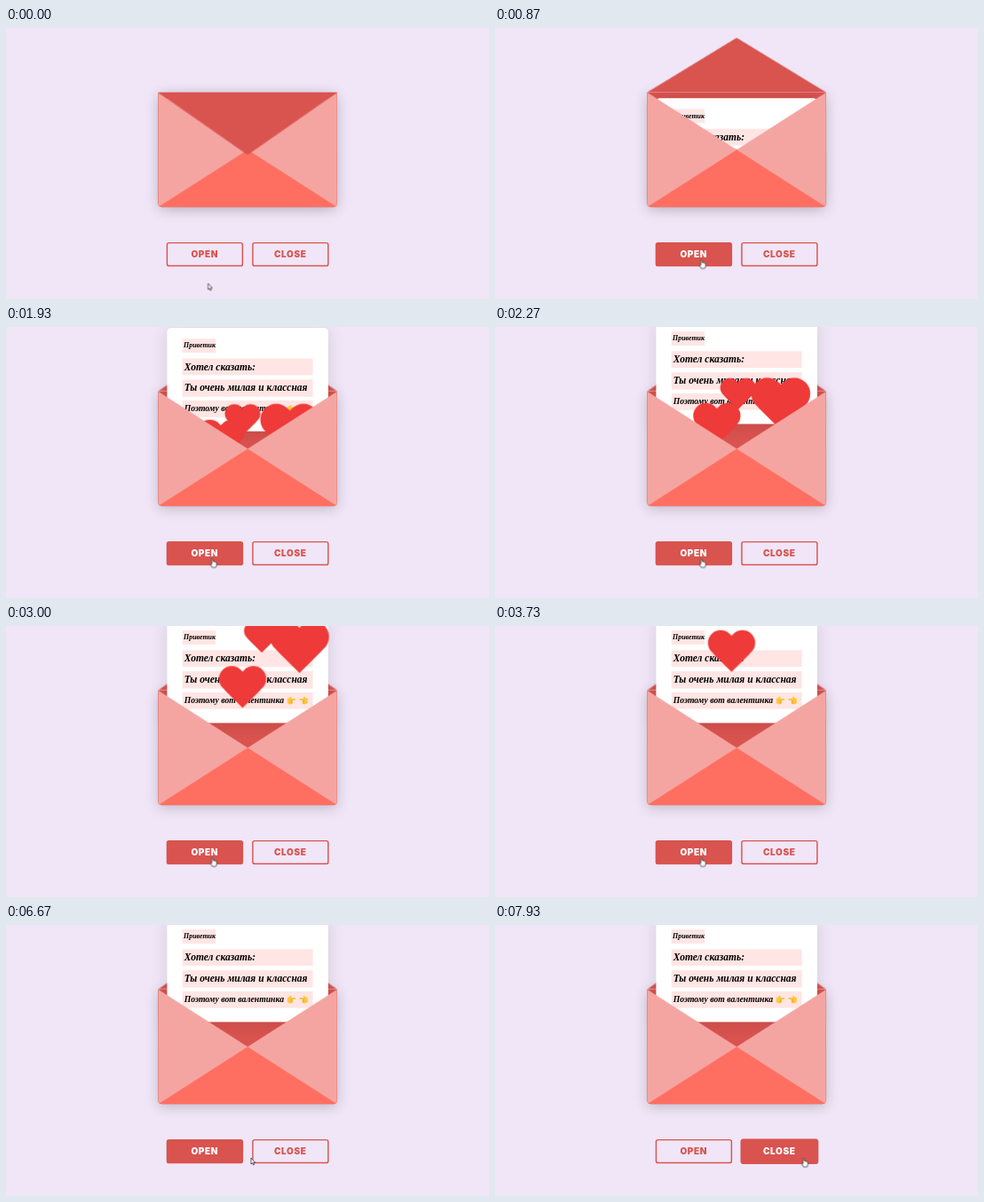
These frames come from a looping animation (544x306 px, 8 s). An HTML page:

```html
<!DOCTYPE html>
<html lang="ru">
<head>
<meta charset="utf-8">
<title>Valentine envelope</title>
<style>
  :root { --red: #d9534f; --coral: #ff6f61; --pink: #f5a5a1; --heart: #ee3a38; --paper: #f0e6f7; }
  html, body { margin: 0; width: 100%; height: 100%; overflow: hidden; background: var(--paper); }
  #stage { position: relative; width: 544px; height: 306px; overflow: hidden; background: var(--paper); }
  #scene { position: absolute; left: 0; top: 0; width: 755.6px; height: 425px; transform: scale(.72); transform-origin: 0 0; }
  #scene * { box-sizing: border-box; }

  .envelope {
    position: absolute; left: 237.8px; top: 100.8px; width: 280px; height: 180px;
    background: var(--red); border-radius: 0 0 6px 6px; box-shadow: 0 4px 20px rgba(0, 0, 0, .2);
  }
  .flap {
    position: absolute; z-index: 5; width: 280px; height: 98px; background: var(--red);
    clip-path: polygon(0 0, 100% 0, 50% 100%); transform-origin: top;
    animation: flap 8s infinite, sink 8s step-end infinite;
  }
  .pocket {
    position: absolute; z-index: 3; width: 0; height: 0; border: solid var(--pink); border-width: 90px 140px;
    border-top-color: transparent; border-bottom-color: var(--coral); border-radius: 0 0 6px 6px;
  }
  #scene .pocket { box-sizing: content-box; }

  .letter {
    position: absolute; z-index: 1; left: 14px; top: 9px; width: 252px; height: 162px;
    background: #fff; border-radius: 6px; box-shadow: 0 2px 26px rgba(0, 0, 0, .12);
    animation: letter 8s infinite;
  }
  .line {
    position: absolute; left: 24.5px; width: 204px; height: 26.5px; padding-left: 2.5px;
    background: #ffe5e3; color: #000; white-space: nowrap;
    font: italic bold 16px/26px "Liberation Serif", serif;
  }
  .hello { top: 17px; width: 52px; height: 22px; padding-left: 1.5px; font-size: 11px; line-height: 21px; }
  .last { font-size: 13.5px; line-height: 25px; }
  .line svg { position: absolute; top: 6px; width: 15px; height: 14px; }

  /* Zero-sized anchors: each heart grows from its top centre */
  .heart {
    position: absolute; z-index: 2; top: 90px; width: 0; height: 0;
    animation: rise 8s linear infinite, sway 8s ease-in-out infinite;
  }
  .heart::before, .heart::after {
    content: ""; position: absolute; left: 0; top: 0; width: 50px; height: 80px;
    background: var(--heart); border-radius: 25px 25px 0 0;
    transform: rotate(-45deg); transform-origin: 0 100%;
  }
  .heart::after { left: -50px; transform: rotate(45deg); transform-origin: 100% 100%; }
  .small  { left: 125.2px; scale: .6; --speed: 120px; --sway: 40px; }
  .large  { left: 204px; --speed: 120px; --sway: 50px; animation-name: rise, slow-sway; }
  .medium { left: 90.4px; scale: .8; --speed: 77.14px; --sway: 45px; }

  .button {
    position: absolute; top: 336px; width: 120px; height: 37.6px; padding: 0;
    border: 2px solid var(--red); border-radius: 4px; background: transparent; color: var(--red);
    font: 900 14px/33.6px Inter, "Open Sans", sans-serif; letter-spacing: .8px; text-align: center;
  }
  .open { left: 250.8px; animation: open-fill 8s linear infinite, open-press 8s step-end infinite; }
  .close { left: 384.8px; animation: close-fill 8s linear infinite, close-press 8s step-end infinite; }

  #cursor { position: absolute; left: 0; top: 0; animation: cursor 8s infinite; }
  #cursor svg { position: absolute; left: 0; top: 0; overflow: visible; }
  .arrow { animation: arrow 8s step-end infinite; }
  .hand { animation: hand 8s step-end infinite; }

  @keyframes flap {
    0%, 8.19% { transform: rotateX(0deg); animation-timing-function: ease; }
    13.19%, 100% { transform: rotateX(180deg); }
  }
  @keyframes sink { 0% { z-index: 5; } 13.19%, 100% { z-index: 0; } }
  @keyframes letter {
    0%, 16.25% { transform: translateY(0); animation-timing-function: ease; }
    28.75%, 100% { transform: translateY(-120px); }
  }
  @keyframes rise {
    0%, 16.94% { translate: 0 0; }
    100% { translate: 0 calc(var(--speed) * -6.645); }
  }
  @keyframes sway {
    0%, 16.94%, 66.94%, 100% { margin-left: 0; }
    41.94% { margin-left: var(--sway); }
  }
  @keyframes slow-sway {
    0%, 16.94% { margin-left: 0; }
    66.94%, 100% { margin-left: var(--sway); }
  }
  @keyframes open-fill {
    0%, 3.25%, 84.75%, 100% { background-color: transparent; color: var(--red); }
    4.5%, 83.5% { background-color: var(--red); color: #fff; }
  }
  @keyframes close-fill {
    0%, 84.25% { background-color: transparent; color: var(--red); }
    85.5%, 100% { background-color: var(--red); color: #fff; }
  }
  @keyframes open-press {
    0%, 8.19%, 100% { box-shadow: none; }
    7.5% { box-shadow: 0 0 0 1px var(--red); }
  }
  @keyframes close-press {
    0% { box-shadow: none; }
    96.6%, 100% { box-shadow: 0 0 0 1px var(--red); }
  }
  @keyframes cursor {
    0%, .87% { transform: translate(227.6px, 288.4px); animation-timing-function: ease-in-out; }
    5%, 79.1% { transform: translate(232.5px, 261.5px); animation-timing-function: ease-in; }
    83.37% { transform: translate(275.7px, 263px); animation-timing-function: ease-out; }
    90.8%, 100% { transform: translate(347.6px, 263.2px); }
  }
  @keyframes arrow {
    0%, 82.7% { visibility: visible; }
    3.2%, 83.6%, 100% { visibility: hidden; }
  }
  @keyframes hand {
    0%, 82.7% { visibility: hidden; }
    3.2%, 83.6%, 100% { visibility: visible; }
  }
</style>
</head>
<body>
<div id="stage">
  <div id="scene">
    <div class="envelope">
      <div class="flap"></div>
      <div class="letter">
        <div class="line hello">Приветик</div>
        <div class="line" style="top:48px">Хотел сказать:</div>
        <div class="line" style="top:81.5px">Ты очень милая и классная</div>
        <div class="line last" style="top:114px">Поэтому вот валентинка
          <svg viewBox="0 0 15 14" style="left:162.5px">
            <g id="point">
              <path d="M1 4Q4 3 6 1Q8 0 8 2L7 4H13.5Q15 5.2 13.5 6.5H9.5V11Q9 13 6 13Q2 13 1 11Z" fill="#ffc83d"/>
              <path d="M6 6.5H9.5M6 9H9.5M6 11H9" fill="none" stroke="#d99a28" stroke-width=".8"/>
            </g>
          </svg>
          <svg viewBox="0 0 15 14" style="left:182px"><use href="#point" transform="matrix(-1 0 0 1 15 0)"/></svg>
        </div>
      </div>
      <div class="heart small"></div>
      <div class="heart large"></div>
      <div class="heart medium"></div>
      <div class="pocket"></div>
    </div>
    <div class="button open">OPEN</div>
    <div class="button close">CLOSE</div>
  </div>
  <div id="cursor">
    <svg class="arrow" width="6" height="9" fill="#fff" stroke="#222" stroke-width=".7">
      <path d="M0 0V7L1.5 5.6L2.5 8L3.6 7.5L2.6 5.2H4.7Z"/>
    </svg>
    <svg class="hand" width="8" height="11" fill="#fff" stroke="#222" stroke-width=".7">
      <path d="M-.8 .6Q0 -.6 .8 .6V3.4Q2 2.8 2.3 3.7Q3.5 3.3 3.7 4.2Q4.8 4 4.8 5V7.4L3.8 10H-.2L-2.4 6.4Q-2.2 5.2 -.8 6.6Z"/>
    </svg>
  </div>
</div>
</body>
</html>
```
